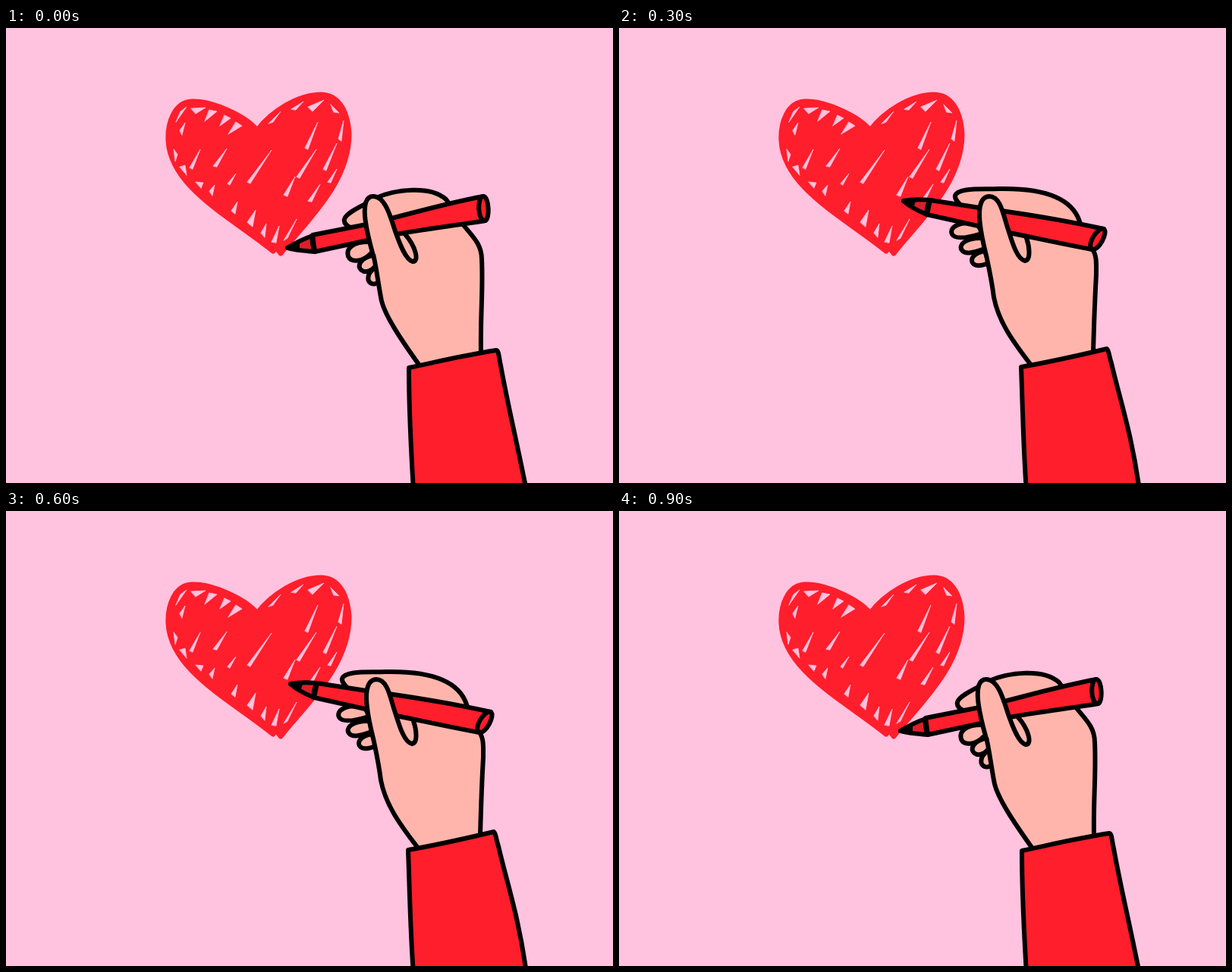
These frames come from a looping animation (800 by 600 pixels, 1 s). An HTML page without scripts:

```html
<!DOCTYPE html>
<html lang="en">
<head>
<meta charset="utf-8">
<title>Heart drawing</title>
<style>
  html, body { margin: 0; width: 100%; height: 100%; overflow: hidden; background: #ffc2df; }
  svg { display: block; width: 100%; height: 100%; }
  path { d: var(--a); stroke-linecap: round; stroke-linejoin: round; }

  /* Every path is morphed from --a to --b; steps(2) adds one pose halfway. */
  .drawing path { animation: boil 1s infinite; }
  .arm path { animation: draw 1s infinite; stroke: #000; stroke-width: 6; }

  .heart { fill: #ff1e2b; stroke: #ff1e2b; stroke-width: 7; }
  .gaps { fill: #ffc2df; stroke: #ffc2df; stroke-width: .8; }
  .skin { fill: #ffb5ac; }
  .red { fill: #ff1e2b; }
  .tip { fill: #dc1f2b; }

  @keyframes boil {
    0%, 30%, 60% { d: var(--a); animation-timing-function: steps(2); }
    20%, 50%, 80% { d: var(--b); animation-timing-function: step-end; }
    90%, 100% { d: var(--a); }
  }
  @keyframes draw {
    0% { d: var(--a); animation-timing-function: steps(2); }
    20% { d: var(--b); animation-timing-function: step-end; }
    30%, 60% { d: var(--b); animation-timing-function: steps(2); }
    50% { d: var(--a); animation-timing-function: step-end; }
    80%, 100% { d: var(--a); }
  }

  .heart {
    --a: path("M362 297 C395 255 452 205 452 140 C450 105 435 88 415 88 C385 88 350 110 331 135 C315 115 270 96 245 97 C222 98 213 125 214 148 C217 210 295 248 352 294 L356 289 Z");
    --b: path("M361 298 C395 255 453 200 453 140 C453 108 430 92 403 91 C375 91 345 115 331 138 C312 110 275 92 248 93 C222 94 208 125 208 148 C212 215 295 245 356 296 L360 296 Z");
  }
  .gaps.left {
    --a: path("M224 124 L238 104 L230 110 Z M244 106 L263 105 L250 113 Z M268 108 L278 110 L262 123 Z M288 115 L296 119 L282 129 Z M303 124 L311 129 L293 140 Z M229 135 L236 125 L232 141 Z M221 160 L223 176 L226 167 Z M229 183 L236 181 L238 194 Z M242 184 L256 160 L246 186 Z M250 203 L260 204 L257 211 Z M268 215 L275 207 L272 221 Z M273 182 L291 159 L278 183 Z M292 205 L303 192 L295 207 Z M297 241 L305 229 L302 245 Z M318 256 L329 240 L325 262 Z M336 270 L343 258 L341 276 Z");
    --b: path("M226 115 L238 102 L231 110 Z M243 100 L258 98 L248 105 Z M266 102 L278 105 L270 110 Z M284 109 L292 114 L283 121 Z M301 120 L311 127 L300 131 Z M228 140 L238 122 L231 142 Z M215 166 L218 178 L221 166 Z M228 186 L233 177 L232 193 Z M243 190 L262 162 L247 191 Z M244 206 L251 192 L253 208 Z M263 214 L270 211 L271 219 Z M277 215 L301 178 L281 217 Z M289 222 L298 208 L292 223 Z M302 240 L330 203 L307 242 Z M326 257 L356 222 L331 259 Z M316 250 L322 242 L319 252 Z");
  }
  .gaps.right {
    --a: path("M318 203 L350 161 L322 205 Z M346 126 L362 110 L352 124 Z M376 107 L392 97 L382 108 Z M398 104 L419 95 L404 110 Z M394 158 L411 124 L398 160 Z M366 220 L381 196 L371 222 Z M383 196 L409 160 L387 198 Z M418 186 L436 152 L422 188 Z M438 146 L445 122 L442 149 Z M428 101 L439 112 L432 111 Z M398 228 L414 206 L403 229 Z M350 282 L360 261 L356 283 Z M366 280 L383 252 L371 277 Z M424 203 L436 186 L428 204 Z");
    --b: path("M330 208 L350 176 L334 209 Z M346 129 L362 117 L352 129 Z M384 104 L398 99 L388 109 Z M404 101 L420 98 L410 106 Z M393 150 L411 122 L397 152 Z M354 207 L382 163 L358 209 Z M383 198 L408 160 L388 200 Z M416 196 L440 150 L421 198 Z M437 144 L447 126 L442 147 Z M427 102 L439 110 L433 109 Z M404 222 L418 201 L408 223 Z M345 262 L360 240 L349 263 Z M370 273 L386 246 L375 274 Z M384 222 L398 204 L389 224 Z");
  }

  .pinky {
    --a: path("M487 316 C477 321 475 332 480 336 C484 339 489 337 492 334");
    --b: path("M484 294 C466 296 462 306 467 311 C472 315 480 313 487 310");
  }
  .ring {
    --a: path("M482 300 C466 304 463 314 468 319 C474 324 482 320 487 314");
    --b: path("M480 277 C455 276 447 287 452 293 C457 300 470 295 482 291");
  }
  .middle {
    --a: path("M478 282 C455 282 448 292 451 301 C455 310 470 308 480 298");
    --b: path("M474 258 C446 254 435 264 439 272 C444 280 462 276 478 271");
  }
  .hand {
    --a: path("M545 445 C520 410 500 380 495 360 C490 335 488 312 482 290 C480 280 478 272 476 265 C462 268 444 262 446 252 C449 242 476 232 488 224 C515 212 560 208 580 226 C590 240 596 250 603 260 C615 275 627 285 627 305 C629 345 625 380 626 430");
    --b: path("M542 443 C515 408 500 385 494 355 C491 330 486 310 482 290 C480 280 478 272 476 265 C462 240 441 230 443 221 C447 210 478 213 500 212 C545 211 595 218 607 255 C612 268 618 280 624 292 C630 300 629 312 629 325 C627 360 626 390 625 428");
  }
  .barrel {
    --a: path("M404 273 L475 259 C520 249 570 233 629 222 L632 254 C590 261 540 266 500 275 L407 295 Z");
    --b: path("M410 227 L475 237 C520 243 580 252 639 265 L623 292 C590 286 540 275 500 267 L406 246 Z");
  }
  .end {
    --a: path("M629 222 C637 222 638 254 631 254 C621 254 621 222 629 222 Z");
    --b: path("M639 265 C645 270 632 294 624 292 C615 288 630 262 639 265 Z");
  }
  .tip {
    --a: path("M371 290 C382 283 392 278 404 274 C403 282 404 288 407 295 C393 294 380 293 371 290 Z");
    --b: path("M375 228 C386 226 398 226 410 227 C406 234 405 240 406 246 C394 241 382 235 375 228 Z");
  }
  .nib {
    --a: path("M371 290 L384 284 L384 291 Z");
    --b: path("M375 228 L388 228 L386 234 Z");
  }
  .thumb {
    --a: path("M484 300 C475 268 464 222 484 222 C500 222 507 250 513 268 C519 285 527 306 536 308 C545 308 540 288 526 272");
    --b: path("M484 300 C476 268 467 223 488 222 C504 222 507 250 513 266 C519 285 525 305 535 307 C543 306 541 288 537 277");
  }
  .sleeve {
    --a: path("M537 610 C534 560 531 500 531 448 C565 441 600 432 646 425 C650 426 649 432 652 445 C662 500 672 540 686 610");
    --b: path("M537 610 C533 560 532 500 530 447 C570 440 605 432 643 423 C646 426 645 430 649 442 C660 490 676 535 686 610");
  }
</style>
</head>
<body>
<svg viewBox="0 0 800 600">
  <g class="drawing">
    <path class="heart"/>
    <path class="gaps left"/>
    <path class="gaps right"/>
  </g>
  <g class="arm">
    <path class="pinky skin"/>
    <path class="ring skin"/>
    <path class="middle skin"/>
    <path class="hand skin"/>
    <path class="barrel red"/>
    <path class="end red"/>
    <path class="tip"/>
    <path class="nib"/>
    <path class="thumb skin"/>
    <path class="sleeve red"/>
  </g>
</svg>
</body>
</html>
```
